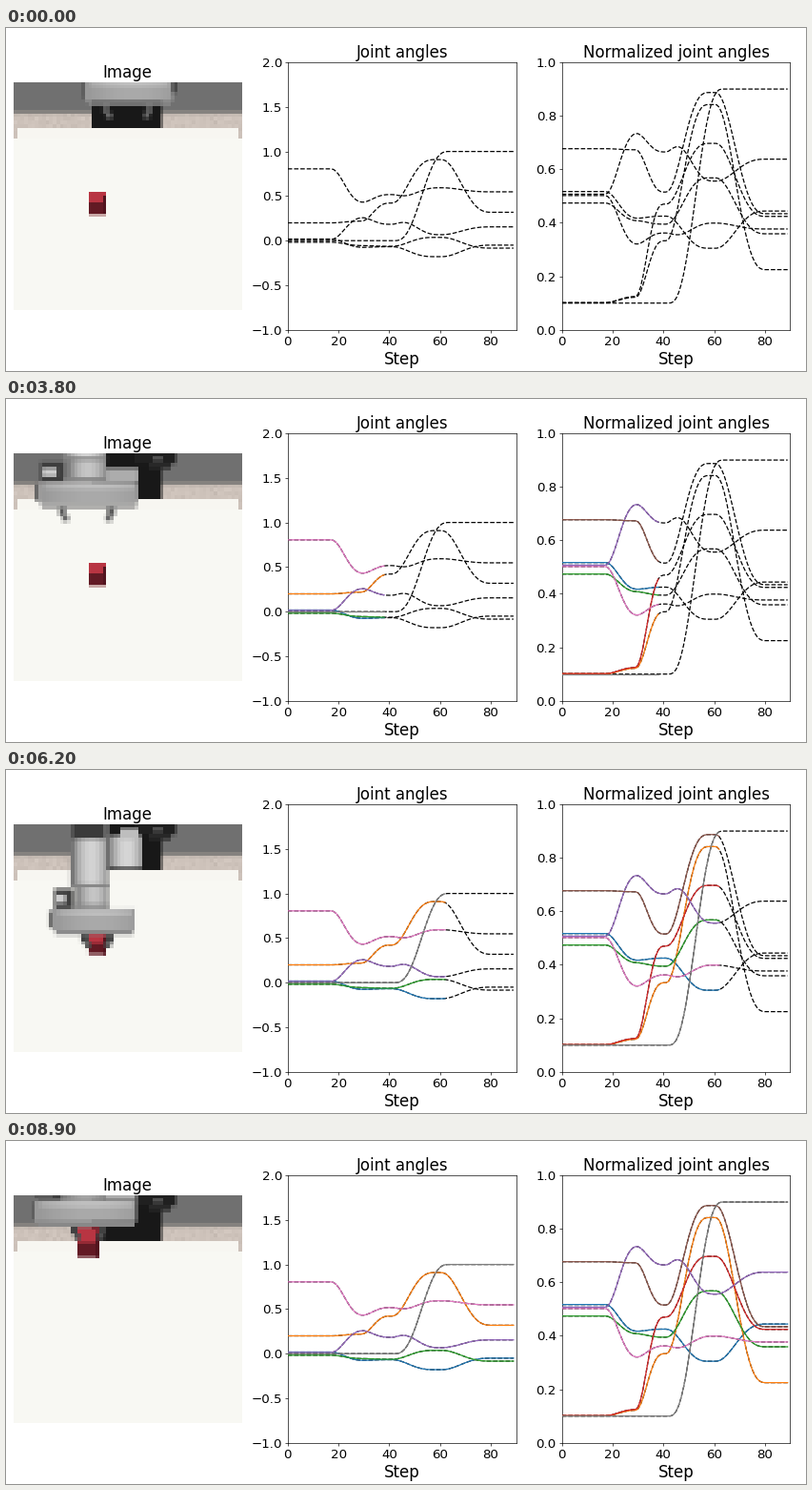
Write a matplotlib script that moves like this. It is 840x360 px and loops after 9 s.

```python
import numpy as np
import matplotlib.pyplot as plt
from matplotlib.animation import FuncAnimation

W, H, DPI = 840, 360, 60
STEPS, N = 90, 64
t = np.arange(STEPS)
cells = np.arange(N)

# The arm moves in four phases: reach, lower, descend, lift
PHASES = [(17, 30.5), (29, 40.5), (41, 58), (60.5, 80.5)]
WIND_LAG = 25


def ease(a, b, skew=0.8):
    """Minimum-jerk step from 0 to 1 between steps a and b."""
    u = np.clip((t - a) / (b - a), 0, 1) ** skew
    return u ** 3 * (10 - 15 * u + 6 * u * u)


def path(*stops, wind=0):
    """Run through one stop per phase; wind delays the descent and swings back first."""
    y = np.full(STEPS, float(stops[0]))
    for k, (a, b) in enumerate(PHASES):
        delta = stops[k + 1] - stops[k]
        if k == 2 and wind:
            y -= wind * delta * ease(a, a + 5)
            a += wind * WIND_LAG
            b += 2
            delta *= 1 + wind
        y += delta * ease(a, b)
    return y


# (normalized position, offset and gain to the angle)
joints = [
    (path(.517, .417, .425, .305, .444), -.463, .93),
    (path(.101, .122, .333, .842, .225), .103, .957),
    (path(.474, .408, .395, .568, .359), -.29, .575),
    (path(.102, .125, .47, .697, .424), None, None),
    (path(.507, .735, .665, .556, .638, wind=.18), -.528, 1.07),
    (path(.677, .673, .515, .887, .434), None, None),
    (path(.502, .32, .362, .399, .377, wind=.18), -.229, 2.06),
    (.1 + .8 * ease(42, 63.5, 1), -.125, 1.25),
]

# Camera scene, in cells of the N x N picture
hand_left = path(20, 9, 7, 11, 6)
hand_right = path(44.5, 34, 35, 34, 34.5)
hand_low = path(6.8, 7.5, 16, 31.6, 9)
lift = ease(*PHASES[3])
grip = ease(46, 60)


def cover(a, b):
    return np.clip(np.minimum(cells + 1, b) - np.maximum(cells, a), 0, 1)


def box(img, x0, y0, x1, y1, color, curve=0):
    """Fill a rectangle; curve darkens its sides like a cylinder."""
    a = (cover(y0, y1)[:, None] * cover(x0, x1))[..., None]
    u = (cells + .5 - x0) / max(x1 - x0, 1) * 2 - 1
    shade = 1 - curve * np.clip((u - .1) ** 2, 0, 1)
    c = np.multiply(color, np.ones(3)) * shade[None, :, None]
    img[:] = img * (1 - a) + c * a


def make_room():
    rng = np.random.default_rng(4)
    img = np.full((N, N, 3), 112.0)
    img[9:16] = (205, 194, 186) + rng.normal(0, 3, (7, N, 1))
    box(img, 0, 8.6, N, 9.2, (165, 157, 151))
    box(img, 1, 13, 63, 16, (247, 246, 241))
    box(img, 0, 16, N, N, (248, 248, 243))
    # robot base and shoulder
    box(img, 22, 0, 41.5, 13, 24)
    box(img, 34, 0, 45.5, 3.2, 32)
    box(img, 38, 3, 44, 4.6, 40)
    box(img, 39, 1, 42, 2.5, 80)
    return img


room = make_room()


def draw_cube(img, i):
    s = lift[i]
    x0, x1 = 21 - 3 * s, 26 - 2 * s
    y0, y1 = 31 - 21.5 * s, 37 - 19.3 * s
    mid = (y0 + y1) / 2
    if s == 0:
        box(img, x0, y1, x1, y1 + .8, (190, 150, 148))
    box(img, x0, y0, x1, y1, (98, 26, 36))
    box(img, x0, y0, x1, mid, (184, 53, 66))
    box(img, x1 - 1, y0 + 1, x1, y1, (82, 20, 30))
    return x0, x1


def draw_arm(img, i, cube):
    x0, x1, low = hand_left[i], hand_right[i], hand_low[i]
    w, top = x1 - x0, low - 7.3
    n0, n1 = x0 + .25 * w, x0 + .68 * w
    drop = 1.5 * (low - 31.6)

    # elbow and forearm
    box(img, n1, 4 + drop, 36, 13 + drop, 214, .35)
    box(img, 30, 2 + drop, 35, 5 + drop, 190)
    box(img, n0 - .8, 0, n1, top - 6, 212, .45)
    box(img, n0 - .3, 0, n1 - 1, low - 27, 58)

    # wrist and its camera
    box(img, n0 + .6, top - 7, n1, top, 198, .4)
    for y in (top - 7, top - 1.2):
        box(img, n0, y, n1, y + 1, 132)
    flange = np.clip((31 - low) / 2.5, 0, 4)
    box(img, n1, top - flange, x1, top, 172)
    box(img, x0 + .5, top - 5.5, n0, top, 62)
    box(img, x0 + 1, top - 4, n0 - 2, top - 1.5, 205)

    # fingers close on the cube
    g = grip[i]
    ends = ((x0 + .2 * w, cube[0] - 2, 1), (x0 + .69 * w, cube[1], -.5))
    for wide, shut, lean in ends:
        x = wide + (shut - wide) * g
        box(img, x, low - .5, x + 2, low + 2.2, 90 - 25 * g)
        box(img, x + lean, low + 2, x + lean + 1.8, low + 3.7, 104 - 25 * g)

    # hand
    box(img, x0 - 1, top + .5, x0, low - 2, 95)
    box(img, x0, top, x1, low - 1.2, 170, .1)
    box(img, x0 + 1.5, top + .3, x1 - 1, top + 2, 192, .1)
    box(img, x0 + .8, low - 1.2, x1 - .5, low, 136)


def scene(i):
    img = room.copy()
    cube = draw_cube(img, i)
    draw_arm(img, i, cube)
    return np.clip(img, 0, 255).astype(np.uint8)


fig = plt.figure(figsize=(W / DPI, H / DPI), dpi=DPI, facecolor="white")


def panel(column, title):
    x, y, w, h = 8 + 287.85 * column, 36, 239.7, 280.8
    ax = fig.add_axes([x / W, 1 - (y + h) / H, w / W, h / H])
    ax.set_title(title, fontsize=20)
    return ax


def chart(column, title, low, high):
    ax = panel(column, title)
    ax.set_xlim(0, STEPS)
    ax.set_ylim(low, high)
    ax.set_xticks(range(0, STEPS, 20))
    ax.set_xlabel("Step", fontsize=20)
    ax.tick_params(labelsize=16)
    return ax


cam = panel(0, "Image")
cam.axis("off")
view = cam.imshow(scene(0), interpolation="nearest")
angles = chart(1, "Joint angles", -1, 2)
normed = chart(2, "Normalized joint angles", 0, 1)

trails = []


def add_joint(ax, y, color):
    ax.plot(t, y, "k--", lw=1.5, zorder=2)
    line, = ax.plot([], [], color=color, lw=1.5, zorder=3)
    trails.append((line, y))


for k, (y, offset, gain) in enumerate(joints):
    add_joint(normed, y, f"C{k}")
    if gain:  # the other joints lie outside the angle axis
        add_joint(angles, offset + gain * y, f"C{k}")


def update(i):
    view.set_data(scene(i))
    for line, y in trails:
        line.set_data(t[:i + 1], y[:i + 1])
    return [view] + [line for line, _ in trails]


anim = FuncAnimation(fig, update, frames=STEPS, interval=100,
                     repeat=True, repeat_delay=0, blit=False)
plt.show()
```
